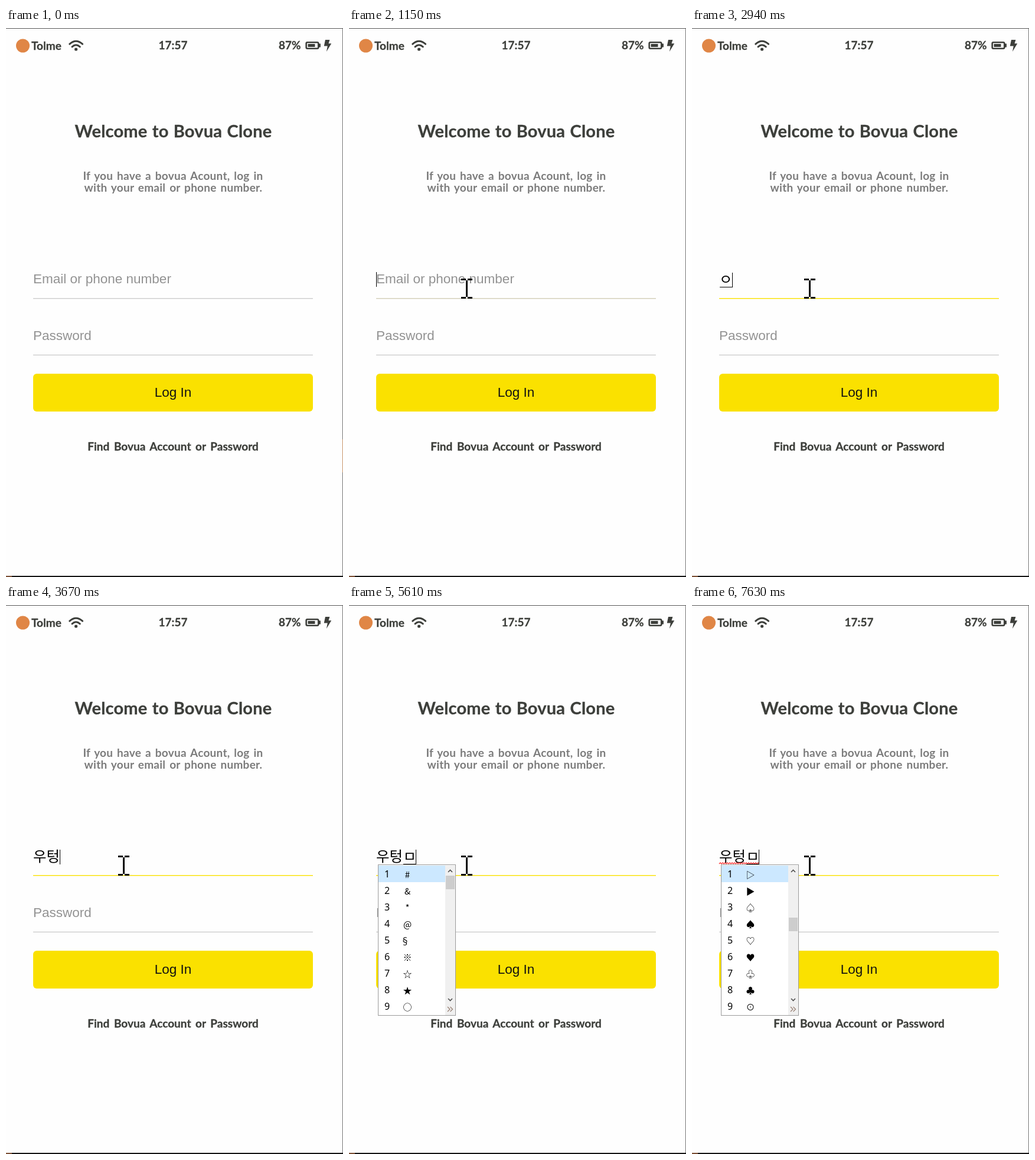
Recreate the animation shown at these times as an HTML page. Size 571 px wide and 929 px high, loop 8 s.

```html
<!DOCTYPE html>
<html lang="en">
<head>
<meta charset="utf-8">
<title>Login screen</title>
<style>
html, body { margin: 0; width: 100%; height: 100%; overflow: hidden; background: #fefefe; }
svg { display: block; width: 100%; height: 100%; }
text { white-space: pre; }

.ui { font: 700 19px Lato, sans-serif; fill: #3d3f3b; stroke: #3d3f3b; stroke-width: .3; stroke-linejoin: round; word-spacing: 3px; }
.title { font-size: 29px; letter-spacing: .2px; word-spacing: 1px; }
.hint { fill: #7b7b7b; stroke: none; letter-spacing: .25px; word-spacing: 2px; }
.mid { text-anchor: middle; }
.field { font: 22.5px "Liberation Sans", Arial, sans-serif; }
.ghost { fill: #929292; }
.hangul { font: 24.4px "Noto Sans CJK KR", "Noto Sans CJK", sans-serif; }
.num { font: 16px "Noto Sans", sans-serif; text-anchor: middle; }
.sym { font: 15px "Noto Sans CJK KR", "DejaVu Sans", sans-serif; text-anchor: middle; }
.icon { fill: none; stroke: #3d3f3b; stroke-width: 3; stroke-linecap: round; }

/* Almost every change is a hard cut on an 8 s clock: 1% = 80 ms. */
.cut { visibility: hidden; animation: 8s step-end infinite; }
.edge { animation-name: edge; visibility: visible; }
.arrow { animation-name: arrow; }
.beam { animation-name: beam; }
.prompt { animation-name: prompt; visibility: visible; }
.caret { animation-name: caret; }
.under { animation-name: under; }
.latin-d { animation-name: latin-d; }
.latin-a { animation-name: latin-a; }
.k1 { animation-name: k1; }
.k2 { animation-name: k2; }
.k3 { animation-name: k3; }
.k4 { animation-name: k4; }
.k5 { animation-name: k5; }
.k6 { animation-name: k6; }
.popup { animation-name: popup; }
.wave { animation-name: wave; }
.pages { animation: pages 8s step-end infinite; }
.thumb { animation: thumb 8s step-end infinite; }
.focus { animation: focus 8s linear infinite; }

@keyframes focus {
  0%, 14% { fill: #ccc }
  17.75%, 100% { fill: #fae100 }
}
@keyframes edge { 14.375% { visibility: hidden } }
@keyframes arrow {
  0% { visibility: hidden }
  4.125% { visibility: visible; transform: translate(447px, 898px) }
  5% { transform: translate(398px, 815px) }
  5.875% { transform: translate(330px, 730px) }
  6.625% { transform: translate(270px, 662px) }
  7.5% { transform: translate(236px, 605px) }
  8.375% { transform: translate(225px, 548px) }
  9.125% { transform: translate(217px, 495px) }
  10% { transform: translate(210px, 458px) }
  10.875% { visibility: hidden }
}
@keyframes beam {
  0% { visibility: hidden; transform: translate(7px, 10px) }
  10.875% { visibility: visible }
  11.625% { transform: translate(4px, 5px) }
  12.5% { transform: translate(1px, 1px) }
  13.5% { transform: none }
  100% { visibility: visible; transform: none }
}
@keyframes prompt {
  25.125% { visibility: hidden }
  34.25% { visibility: visible }
  36.75% { visibility: hidden }
}
@keyframes caret {
  0% { visibility: hidden; transform: none }
  14.375% { visibility: visible }
  21% { visibility: hidden }
  25.125% { visibility: visible; transform: translate(13px, -1px) }
  32.625% { visibility: hidden }
  36.75% { visibility: visible; transform: translate(22px, 1px) }
  39.75% { transform: translate(45px, 1px) }
  52.5% { visibility: hidden }
  53.375% { visibility: visible; transform: translate(57px, 1px) }
  60% { visibility: hidden }
  66.875% { visibility: visible; transform: translate(45px, 1px) }
  67.75% { transform: translate(67px, 1px) }
  74.25% { visibility: hidden }
  81.125% { visibility: visible }
  87.125% { visibility: hidden }
  93.875% { visibility: visible }
}
@keyframes under {
  0% { visibility: hidden; transform: none }
  36.75% { visibility: visible }
  39.75% { transform: translateX(22px) }
  45.875% { visibility: hidden }
  67.75% { visibility: visible; transform: translateX(45px) }
}
@keyframes latin-d { 25.125% { visibility: visible } 34.25% { visibility: hidden } }
@keyframes latin-a { 53.375% { visibility: visible } 65% { visibility: hidden } }
@keyframes k1 { 36.75% { visibility: visible } 38.625% { visibility: hidden } }
@keyframes k2 { 38.625% { visibility: visible } }
@keyframes k3 { 39.75% { visibility: visible } 40.75% { visibility: hidden } }
@keyframes k4 { 40.75% { visibility: visible } 41.75% { visibility: hidden } }
@keyframes k5 { 41.75% { visibility: visible } }
@keyframes k6 { 67.75% { visibility: visible } }
@keyframes popup { 70.125% { visibility: visible } }
@keyframes wave { 80.25% { visibility: visible } }
@keyframes pages {
  0% { transform: none }
  90.5% { transform: translateY(-252px) }
  93% { transform: translateY(-504px) }
  95.375% { transform: translateY(-756px) }
}
@keyframes thumb {
  0% { transform: none }
  90.5% { transform: translateY(24px) }
  93% { transform: translateY(47px) }
  95.375% { transform: translateY(71px) }
}
</style>
</head>
<body>
<svg viewBox="0 0 571 929">
  <clipPath id="list"><rect x="50" y="441" width="113" height="253"/></clipPath>

  <!-- window edges -->
  <path d="M0 0H571V1H0z" fill="#555"/>
  <path d="M570 0H571V929H570z" fill="#777"/>
  <path class="cut edge" d="M570 696H571V752H570z" fill="#c89468"/>
  <path d="M0 927H571V929H0z" fill="#151515"/>
  <path d="M0 927H10V929H0z" fill="#7a4e34"/>

  <!-- status bar -->
  <circle cx="28.5" cy="30" r="11.5" fill="#e08646"/>
  <g class="ui">
    <text x="43" y="37">Tolme</text>
    <text class="mid" x="283" y="36">17:57</text>
    <text x="462" y="36">87%</text>
  </g>
  <path class="icon" d="M107.8 27.2Q118.5 17.2 129.6 27.2M112 31.8Q118.5 25.8 125.3 31.8"/>
  <circle cx="118.6" cy="36" r="2.6" fill="#3d3f3b"/>
  <rect class="icon" x="508.7" y="24.2" width="20.6" height="10.6" rx="2" style="stroke-width:2.6"/>
  <path d="M511.5 27h12v5h-12zM530 26.5h3v6h-3zM541 20h7.5l-2 6.3h4.8L543 40l1.8-9.5h-6z" fill="#3d3f3b"/>

  <!-- login form -->
  <g class="ui mid">
    <text class="title" x="283.5" y="185">Welcome to Bovua Clone</text>
    <text class="hint" x="283" y="257">If you have a bovua Acount, log in</text>
    <text class="hint" x="283.5" y="277">with your email or phone number.</text>
    <text x="283" y="715">Find Bovua Account or Password</text>
  </g>
  <rect class="focus" x="46" y="457" width="474" height="1.4"/>
  <rect x="46" y="552.7" width="474" height="1.4" fill="#ccc"/>
  <rect x="46" y="585" width="474" height="64" rx="6" fill="#fae100"/>
  <g class="field">
    <text class="ghost cut prompt" x="46" y="432">Email or phone number</text>
    <text class="ghost" x="46" y="528">Password</text>
    <text class="mid" x="283" y="624" fill="#111">Log In</text>
    <text class="cut latin-d" x="46" y="432">d</text>
    <text class="cut latin-a" x="91" y="434">a</text>
  </g>
  <g class="hangul">
    <text class="cut k1" x="46" y="434">ㅇ</text>
    <text class="cut k2" x="46" y="434">우</text>
    <text class="cut k3" x="68.5" y="434">ㅌ</text>
    <text class="cut k4" x="68.5" y="434">터</text>
    <text class="cut k5" x="68.5" y="434">텅</text>
    <text class="cut k6" x="91.5" y="434">ㅁ</text>
  </g>
  <path class="cut wave" id="wave" fill="none" stroke="#f22" stroke-width="1.2"/>
  <rect class="cut under" x="47" y="438" width="21" height="1"/>
  <rect class="cut caret" x="46" y="413" width="1" height="25"/>

  <!-- symbol picker -->
  <g class="cut popup">
    <rect x="49.5" y="439.5" width="131" height="255" fill="#fff" stroke="#9a9a9a"/>
    <rect x="50" y="441" width="113" height="28" fill="#cce8ff"/>
    <path d="M163 441H180V694H163z" fill="#f0f0f0"/>
    <rect class="thumb" x="164" y="458" width="15" height="23" fill="#cdcdcd"/>
    <path d="M168 452l3.5-3.5 3.5 3.5M168 666l3.5 3.5 3.5-3.5" fill="none" stroke="#505050" stroke-width="1.6"/>
    <path d="M167 680l4 4-4 4M171.5 680l4 4-4 4" fill="none" stroke="#967f72" stroke-width="1.2"/>
    <g class="num" id="numbers"></g>
    <g clip-path="url(#list)"><g class="sym pages" id="symbols"></g></g>
  </g>

  <!-- pointer -->
  <path class="cut beam" d="M190 425.5h8M201 425.5h8M190 456.5h8M201 456.5h8M199.5 427V455" stroke="#000" stroke-width="3"/>
  <path class="cut arrow" d="M.5.5V33L7.5 26.5 12.5 37.5 17 35.5 12.5 25H24.5z" fill="#fff" stroke="#000" stroke-width="1.1"/>
</svg>
<script>
const byId = id => document.getElementById(id);
const rowPitch = 28;

function addRows(group, labels, x, firstBaseline) {
  labels.forEach((label, i) => {
    const row = document.createElementNS("http://www.w3.org/2000/svg", "text");
    row.setAttribute("x", label === "§" ? x - 4 : x);
    row.setAttribute("y", firstBaseline + i * rowPitch);
    row.textContent = label;
    group.append(row);
  });
}

addRows(byId("numbers"), [..."123456789"], 64.5, 461);
addRows(byId("symbols"), [..."#&*@§※☆★○●◎◇◆□■△▲▽▼→←↑↓↔〓◁◀▷▶♤♠♡♥♧♣⊙"], 99, 462);
byId("wave").setAttribute("d", "M46 438" + "l2-2 2 2".repeat(17));
</script>
</body>
</html>
```
